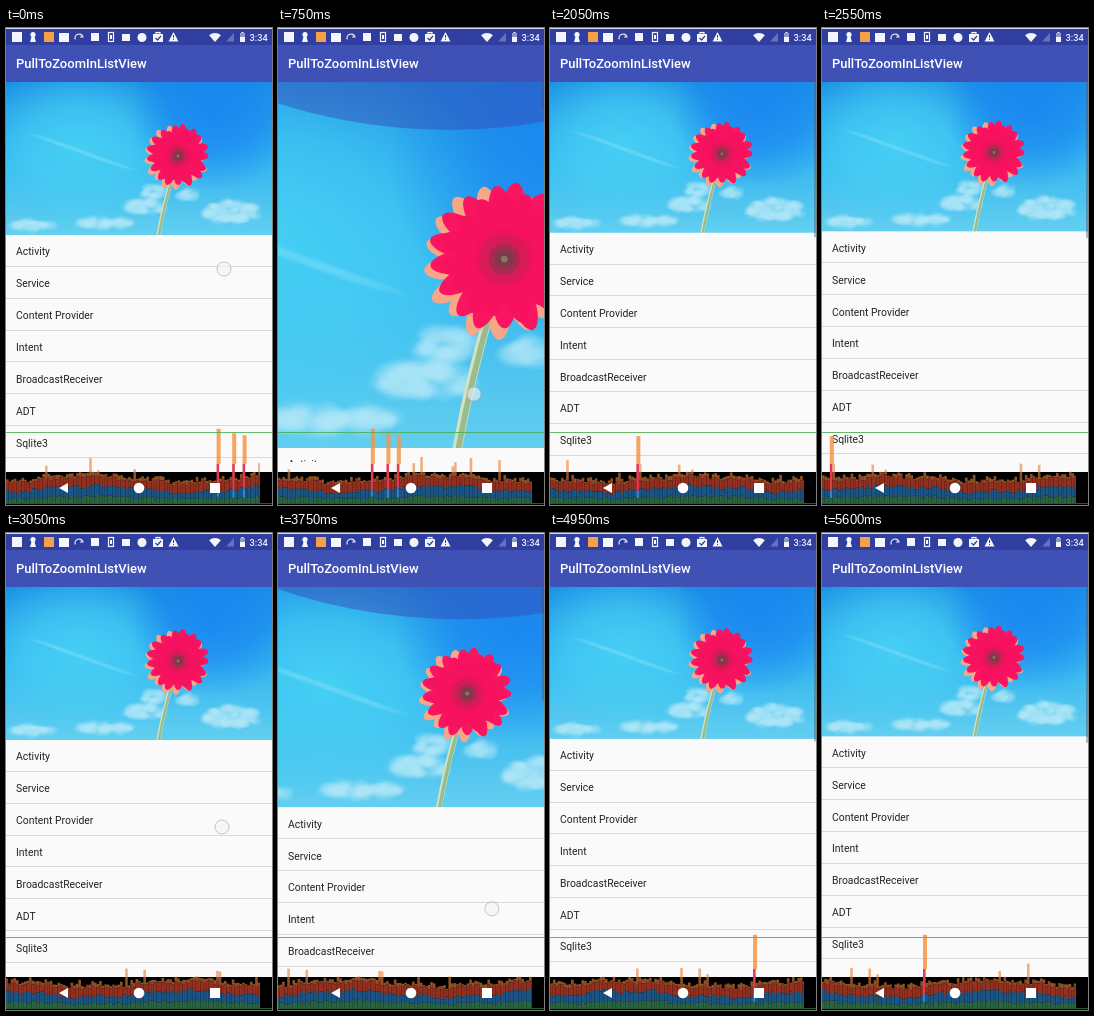
These frames come from a looping animation (266 by 477 pixels, 5.65 s). An HTML page with a canvas:

```html
<!DOCTYPE html>
<html lang="en">
<head>
<meta charset="utf-8">
<title>Pull to zoom list</title>
<style>
html, body { margin: 0; width: 100%; height: 100%; overflow: hidden; background: #000; }
canvas { display: block; width: 266px; height: 477px; }
</style>
</head>
<body>
<canvas id="stage" width="266" height="477"></canvas>
<script>
const c = document.getElementById('stage').getContext('2d');
const W = 266, LOOP = 5650, BAR = 54, NAV = 444, REST = 207, ROW = 31.85, SETTLE = 350;
const items = ['Activity', 'Service', 'Content Provider', 'Intent', 'BroadcastReceiver', 'ADT', 'Sqlite3'];

// Each pull stretches the header to peak, drifts to last, then springs back
const pulls = [
  { start: 0, top: 750, release: 1600, peak: 420, last: 389, path: [[218, 241], [196, 366], [77, 397]] },
  { start: 3050, top: 4350, release: 4550, peak: 332, last: 350, path: [[216, 294], [212, 446], [211, 458]] }
];

const mix = (a, b, p) => a + (b - a) * p;
const clamp = p => Math.min(1, Math.max(0, p));
const smooth = p => p * p * (3 - 2 * p);
const rnd = n => { const s = Math.sin(n * 127.1 + 11.7) * 43758.5453; return s - Math.floor(s); };

function pose(t) {
  const p = pulls.findLast(q => q.start <= t);
  const rise = clamp((t - p.start) / (p.top - p.start));
  const drift = clamp((t - p.top) / (p.release - p.top));
  const back = smooth(clamp((t - p.release) / SETTLE));
  const idle = Math.max(0, t - p.release - SETTLE);
  const stretch = mix(mix(0, p.peak - REST, rise), p.last - REST, drift) * (1 - back);
  const [a, b, d] = p.path;
  const [x, y] = [0, 1].map(k => mix(mix(a[k], b[k], rise), d[k], drift));
  return {
    edge: REST + stretch - Math.min(3.5, idle / 45),
    glow: 48 * clamp(stretch / 100) * (1 - drift / 3),
    x, y, alpha: t <= p.release ? .8 - drift * .55 : 0
  };
}

function rect(x, y, w, h, color) { c.fillStyle = color; c.fillRect(x, y, w, h); }
function disc(x, y, r, color) {
  c.fillStyle = color;
  c.beginPath(); c.arc(x, y, r, 0, 7); c.fill();
}
function poly(points, color) {
  c.fillStyle = color;
  c.beginPath(); points.forEach(p => c.lineTo(...p)); c.fill();
}
function text(s, x, y, font, color) { c.font = font; c.fillStyle = color; c.fillText(s, x, y); }

function puff(x, y, rx, ry, rgb, alpha, turn = 0) {
  c.save();
  c.translate(x, y); c.rotate(turn); c.scale(rx, ry);
  const g = c.createRadialGradient(0, 0, 0, 0, 0, 1);
  g.addColorStop(0, `rgba(${rgb},${alpha})`);
  g.addColorStop(.5, `rgba(${rgb},${alpha * .7})`);
  g.addColorStop(1, `rgba(${rgb},0)`);
  disc(0, 0, 1, g);
  c.restore();
}

function cloud(x, y, w, h) {
  const n = Math.ceil(w * h / 9);
  for (let i = 0; i < n; i++) {
    const a = rnd(x + i * 3) * 2 - 1, b = rnd(y + i * 5) * 2 - 1, r = 2.5 + rnd(i + x) * 3.5;
    puff(x + a * w / 2, y + b * h / 2 * (1 - a * a * .6), r * 1.5, r, '175,230,247', .38);
  }
}

function petals(x, y, n, len, width, color, seed) {
  c.fillStyle = color;
  for (let i = 0; i < n; i++) {
    const l = len * (.9 + .12 * rnd(i + seed));
    c.save();
    c.translate(x, y); c.rotate((i + rnd(i * 2 + seed) * .4) / n * Math.PI * 2);
    c.beginPath(); c.ellipse(l * .58, 0, l * .42, width, 0, 0, 7); c.fill();
    c.restore();
  }
}

// Scene in rest-size units, x measured from the middle
function photo() {
  const sky = c.createLinearGradient(0, 0, 0, 153);
  sky.addColorStop(0, '#1b8fe4');
  sky.addColorStop(.5, '#33b4ef');
  sky.addColorStop(1, '#62cff0');
  rect(-133, 0, 266, 155, sky);
  puff(-60, 65, 105, 85, '72,210,245', .9);
  puff(75, 30, 85, 80, '24,130,243', .8);
  for (let i = 0; i < 4; i++) puff(-90 + i * 22, 58 + i * 8, 26, 2.5, '150,228,248', .35, .3);
  cloud(14, 110, 20, 12);
  cloud(6, 125, 36, 12);
  cloud(-34, 141, 50, 9);
  cloud(48, 112, 14, 9);
  cloud(92, 130, 50, 20);
  cloud(-105, 143, 40, 9);

  for (const [width, color, dx] of [[4, '#d3e3c0', 0], [2.4, '#9abb8e', .5]]) {
    c.strokeStyle = color; c.lineWidth = width;
    c.beginPath(); c.moveTo(34 + dx, 92); c.quadraticCurveTo(25 + dx, 122, 19 + dx, 155); c.stroke();
  }

  c.save();
  c.translate(39, 74);
  petals(-1.6, 1.2, 17, 32.5, 5, '#f7a688', 3);
  petals(.8, -1, 17, 32, 5, '#fb1560', 5);
  petals(.8, -1, 15, 28, 5, '#f7125f', 21);
  disc(0, 0, 13, '#f0125d');
  disc(0, 0, 10.5, '#d81a58');
  disc(0, 0, 6.5, '#a82a50');
  disc(0, 0, 4, '#7f3a4a');
  disc(0, 0, 1.4, '#8a7560');
  c.restore();
}

function header({ edge, glow, x }) {
  const scale = Math.max(1, (edge - BAR) / (REST - BAR));
  c.save();
  c.beginPath(); c.rect(0, BAR, W, edge - BAR); c.clip();
  c.save();
  c.translate(W / 2, BAR + Math.min(0, edge - REST));
  c.scale(scale, scale);
  photo();
  c.restore();
  if (glow > 0) disc(mix(W / 2, x, .6), BAR + glow - 560, 560, 'rgba(55,72,178,.47)');
  c.restore();
}

function list(edge) {
  rect(0, edge, W, NAV - edge, '#fafafa');
  c.save();
  c.beginPath(); c.rect(0, edge, W, 434 - edge); c.clip();
  items.forEach((s, i) => {
    const top = edge + i * ROW;
    text(s, 10, top + 20.4, '10.4px Roboto, sans-serif', '#222');
    rect(0, Math.round(top + ROW - 1), W, 1, '#d9d9d9');
  });
  c.restore();
}

function statusBar() {
  const white = '#f4f5fc', base = '#303f9f';
  rect(0, 0, W, 17, base);
  rect(0, 0, W, 1, '#d5d9ea');
  rect(6, 4, 10, 10, white);
  disc(27, 6.5, 2.6, white);
  poly([[25.7, 8], [28.3, 8], [30, 14], [24, 14]], white);
  rect(38, 4, 10, 10, '#f5a04a');
  rect(53, 5, 10, 9, white);
  c.strokeStyle = white; c.lineWidth = 1.2;
  c.beginPath(); c.arc(73, 10, 4, 2.8, 6); c.lineTo(74, 9); c.stroke();
  rect(85, 5, 8, 8, white);
  c.strokeRect(102.5, 4.5, 5, 9); rect(104, 7, 2, 4, white);
  rect(116, 6, 8, 7, white);
  disc(136, 9.5, 4.5, white);
  c.strokeRect(150, 4.5, 4, 2); rect(147, 6, 10, 8, white);
  c.strokeStyle = base;
  c.beginPath(); c.moveTo(149.5, 10); c.lineTo(151.5, 12); c.lineTo(155, 8); c.stroke();
  poly([[167.5, 4], [172.5, 13.5], [162.5, 13.5]], white);
  rect(167, 7, 1, 3, base); rect(167, 11, 1, 1, base);
  c.fillStyle = white;
  c.beginPath(); c.moveTo(209, 14); c.arc(209, 14, 9, -2.28, -.86); c.fill();
  poly([[220, 13.5], [228, 13.5], [228, 5]], '#6672ba');
  rect(234, 5, 5, 9, '#8e98cf'); rect(235.5, 4, 2, 1, white); rect(234, 9, 5, 5, white);
  text('3:34', 243.5, 13, '500 9.2px Roboto, sans-serif', white);
}

// Frame-time graph scrolling left; slow frames stand out as tall bars
function graph(t) {
  const pitch = 2.6, shift = t * .157;
  const slow = [211, 226, 236, 409, 980].map(w => Math.round(w / pitch));
  c.save();
  c.beginPath(); c.rect(0, 395, 254, 82); c.clip();
  for (let i = Math.floor(shift / pitch); i * pitch < shift + 254; i++) {
    const x = i * pitch - shift;
    const swell = Math.sin(i * .085 + 2) * 3 + Math.sin(i * .31);
    const green = 468 + swell * .4 + rnd(i) * 3;
    const blue = 459 + swell + rnd(i + 20) * 4;
    const red = 450 + swell + rnd(i + 40) * 4;
    const tall = slow.includes(i);
    const spike = rnd(i + 80) > .94 ? 6 + rnd(i + 90) * 12 : 0;
    const top = tall ? 400 + rnd(i) * 10 : red - 1 - rnd(i + 60) * 4 - spike;
    const redTop = tall ? 436 : red;
    rect(x, top, tall ? 4 : pitch, redTop - top, tall ? 'rgba(246,150,70,.85)' : 'rgba(232,130,60,.62)');
    rect(x, redTop, pitch, blue - redTop, tall ? '#e23a50' : '#93301f');
    rect(x, blue, pitch, green - blue, tall ? '#2f86cc' : '#1b5586');
    rect(x, green, pitch, 475 - green, '#2b6440');
  }
  c.restore();
  rect(0, 404, W, 1, 'rgba(75,175,80,.85)');
  rect(0, 475, W, 1, 'rgba(50,130,70,.7)');
}

function navBar(t) {
  rect(0, NAV, W, 33, '#000');
  graph(t);
  poly([[53, 460], [62, 455], [62, 465]], '#fff');
  disc(133, 460, 5.3, '#fff');
  rect(204, 455, 10, 10, '#fff');
}

function finger({ x, y, alpha }) {
  c.globalAlpha = alpha;
  disc(x, y, 7, 'rgba(244,244,248,.75)');
  c.strokeStyle = 'rgba(160,165,185,.8)'; c.lineWidth = 1;
  c.stroke();
  c.globalAlpha = 1;
}

function draw(time) {
  const step = Math.floor(time % LOOP / 50) * 50;
  const t = step > 3750 && step < 3950 ? 3750 : step; // the screen stalls briefly
  const now = pose(t);

  header(now);
  list(now.edge);
  if (now.edge !== REST) rect(264, BAR, 2, Math.max(20, 155 - (now.edge - 205) * .6), 'rgba(70,80,110,.4)');
  statusBar();
  rect(0, 17, W, BAR - 17, '#3f51b5');
  text('PullToZoomInListView', 10, 39.8, '500 13px Roboto, sans-serif', '#fff');
  navBar(t);
  finger(now);
}

const start = performance.now();
function loop() {
  draw(performance.now() - start);
  requestAnimationFrame(loop);
}
loop();
</script>
</body>
</html>
```
